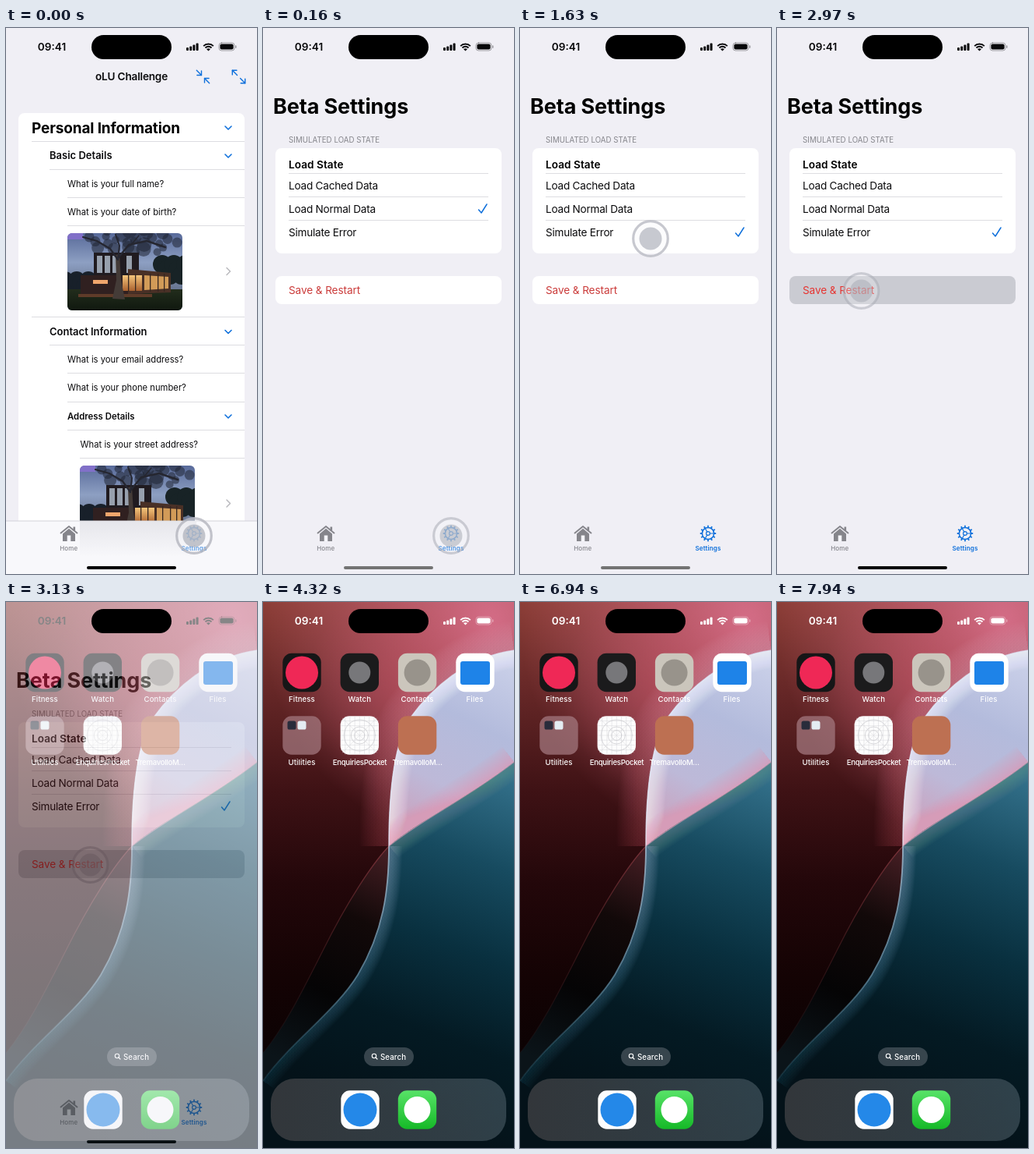
Write an HTML page with a canvas that moves like this. It is 323 px wide and 700 px high and loops after 8 s.

```html
<!DOCTYPE html>
<html lang="en">
<head>
<meta charset="utf-8">
<title>Settings demo</title>
<style>
html, body { margin: 0; width: 100%; height: 100%; overflow: hidden; background: #f0eff5; }
canvas { display: block; width: 323px; height: 700px; }
</style>
</head>
<body>
<canvas id="stage"></canvas>
<script>
const W = 323, H = 700, LOOP = 8000;
const BLUE = '#0f70db', GRAY = '#85858b', PAGE = '#f0eff5', LINE = '#dddde1';
const dpr = window.devicePixelRatio || 1;

function layer(el = document.createElement('canvas')) {
  el.width = Math.round(W * dpr);
  el.height = Math.round(H * dpr);
  const ctx = el.getContext('2d');
  ctx.scale(dpr, dpr);
  return ctx;
}

const out = layer(document.getElementById('stage'));
const app = layer(), home = layer();
let c = out;

const clamp = v => Math.max(0, Math.min(1, v));
const span = (t, a, b) => clamp((t - a) / (b - a));
const ease = p => p * p * (3 - 2 * p);
const mix = (a, b, p) => a + (b - a) * p;

// y is the middle of the capital letters
function text(s, x, y, size, weight = 400, color = '#0b0b0d', gap = 0, align = 'left') {
  c.font = `${weight} ${size}px Inter, "Open Sans", sans-serif`;
  c.letterSpacing = gap + 'px';
  c.textAlign = align;
  c.fillStyle = color;
  c.fillText(s, x, y + size * 0.364);
}

function rect(x, y, w, h, color, r = 0) {
  c.beginPath();
  c.roundRect(x, y, w, h, r);
  c.fillStyle = color;
  c.fill();
}

function disc(x, y, r, color) {
  c.beginPath();
  c.arc(x, y, r, 0, Math.PI * 2);
  c.fillStyle = color;
  c.fill();
}

function ring(x, y, r, color, width) {
  c.beginPath();
  c.arc(x, y, r, 0, Math.PI * 2);
  c.strokeStyle = color;
  c.lineWidth = width;
  c.stroke();
}

function trace(points) {
  c.beginPath();
  points.forEach(p => c.lineTo(p[0], p[1]));
}

function line(points, color, width) {
  trace(points);
  c.strokeStyle = color;
  c.lineWidth = width;
  c.lineCap = c.lineJoin = 'round';
  c.stroke();
}

function shape(points, color) {
  trace(points);
  c.fillStyle = color;
  c.fill();
}

function fade(x0, y0, x1, y1, ...colors) {
  const g = c.createLinearGradient(x0, y0, x1, y1);
  colors.forEach((k, i) => g.addColorStop(i / (colors.length - 1), k));
  return g;
}

const divider = (x, y, end = 307) => rect(x, y, end - x, 1, LINE);
const chevDown = y => line([[282, y - 2], [286, y + 2], [290, y - 2]], BLUE, 1.6);
const chevRight = y => line([[284, y - 4.5], [288.5, y], [284, y + 4.5]], '#b9b9be', 1.5);
const check = y => line([[277.5, y + 1], [281, y + 5], [288, y - 6]], BLUE, 1.5);

function statusBar(color) {
  text('09:41', 59, 24.5, 13.6, 600, color, 0, 'center');
  rect(110, 9, 103, 31, '#000', 15.5);
  [4, 5.5, 7.5, 9.5].forEach((h, i) => rect(232 + i * 4.2, 29 - h, 3, h, color, 1));
  c.save();
  c.beginPath();
  c.moveTo(260.5, 29.5);
  c.arc(260.5, 29.5, 10.5, -Math.PI * 0.75, -Math.PI * 0.25);
  c.clip();
  ring(260.5, 29.5, 9, color, 2);
  ring(260.5, 29.5, 5.7, color, 1.9);
  disc(260.5, 29.5, 3.3, color);
  c.restore();
  c.globalAlpha = 0.4;
  c.beginPath();
  c.roundRect(274, 19, 20, 10, 3.4);
  c.strokeStyle = color;
  c.lineWidth = 0.9;
  c.stroke();
  rect(295.2, 22.3, 1.3, 3.5, color, 1);
  c.globalAlpha = 1;
  rect(275.4, 20.4, 17.2, 7.2, color, 2.1);
}

function gear(x, y) {
  c.save();
  c.translate(x, y);
  ring(0, 0, 7.6, BLUE, 1.5);
  ring(0, 0, 2.4, BLUE, 1.2);
  for (let i = 0; i < 12; i++) {
    c.rotate(Math.PI / 6);
    line([[8.4, 0], [9.5, 0]], BLUE, 1.8);
    if (i % 4 === 3) line([[2.6, 0], [7.2, 0]], BLUE, 1.2);
  }
  c.restore();
}

function tabs() {
  line([[70.5, 647.5], [81, 639], [91.5, 647.5]], GRAY, 1.9);
  rect(86.5, 639.5, 2.6, 5, GRAY);
  shape([[73, 648.5], [81, 641.8], [89, 648.5], [89, 658], [73, 658]], GRAY);
  rect(78.7, 650.5, 4.6, 7.5, '#f5f5f9');
  text('Home', 80.7, 667, 8, 500, GRAY, 0.1, 'center');
  gear(242, 648);
  text('Settings', 242, 667, 8.1, 600, BLUE, 0.1, 'center');
}

function touch(x, y, alpha, ink = '#b4b6bf') {
  if (alpha <= 0) return;
  c.globalAlpha = alpha * 0.35;
  disc(x, y, 22, '#f6f6f9');
  c.globalAlpha = alpha * 0.8;
  ring(x, y, 22.3, ink, 3.2);
  disc(x, y, 14.5, ink);
  c.globalAlpha = 1;
}

// night view of a lit house under a tree
function photo(x, y) {
  c.save();
  c.beginPath();
  c.roundRect(x, y, 148, 99, 6);
  c.clip();
  c.translate(x, y);
  rect(0, 0, 148, 99, fade(0, 0, 0, 75, '#586a9a', '#8d9fc2', '#64718c'));
  rect(0, 0, 20, 8, '#8170c8');
  for (let i = 0; i < 26; i++) {
    const a = i * 2.4, d = Math.sqrt(i / 26);
    c.globalAlpha = 0.55;
    disc(86 + Math.cos(a) * d * 62, 10 + Math.sin(a) * d * 17, 5 + i % 4 * 1.5, '#202634');
  }
  c.globalAlpha = 1;
  for (let i = 0; i < 8; i++) {
    disc(i * 5 - 3, 60 + i % 3 * 4, 11, '#18202a');
    disc(122 + i * 5, 40 + i % 3 * 7, 12, '#182326');
  }
  rect(0, 72, 148, 27, fade(0, 72, 0, 99, '#222d1c', '#10180f'));
  rect(34, 25, 58, 33, '#201b20');
  [38, 48, 58, 76].forEach(wx => rect(wx, 29, 7, 22, '#97a0ad'));
  rect(17, 54, 80, 25, '#302020');
  shape([[78, 46], [133, 51], [133, 76], [78, 78]], '#493026');
  rect(33, 60, 19, 5, '#f0a66c');
  rect(71, 54, 25, 20, fade(71, 54, 71, 74, '#f5c67c', '#aa612f'));
  shape([[99, 54], [130, 56], [130, 71], [99, 73]], '#d29b58');
  [78, 87, 106, 116, 124].forEach(wx => rect(wx, 52, 1.3, 23, '#352620'));
  rect(14, 78, 95, 4, '#5f3b29');
  shape([[58, 84], [63, 60], [62, 28], [67, 27], [69, 60], [74, 85]], '#443b37');
  line([[65, 34], [55, 20], [38, 10], [20, 5]], '#252630', 2.2);
  line([[65, 32], [79, 15], [102, 10], [126, 18]], '#252630', 2.4);
  line([[65, 34], [67, 16], [62, 2]], '#252630', 2);
  line([[82, 15], [92, 3]], '#252630', 1.4);
  c.restore();
}

function arrows(x, y, dir) {
  [-1, 1].forEach(s => {
    const near = [x + 2 * s, y + 2 * s], far = [x + 8.2 * s, y + 8.2 * s];
    const tip = dir > 0 ? far : near, k = 5.6 * s * dir;
    line([near, far], BLUE, 1.4);
    line([[tip[0] - k, tip[1]], tip, [tip[0], tip[1] - k]], BLUE, 1.4);
  });
}

function formPage() {
  rect(0, 0, W, H, PAGE);
  text('oLU Challenge', 161.5, 62, 13.6, 600, '#0b0b0d', -0.2, 'center');
  arrows(253.5, 62.5, -1);
  arrows(299.5, 62.5, 1);
  rect(16, 109, 291, 530, '#fff', [8, 8, 0, 0]);
  text('Personal Information', 33, 128, 19, 700, '#000', -0.15);
  [[56, 163.5, 'Basic Details', 13], [56, 389, 'Contact Information', 13], [79, 497.5, 'Address Details', 11.4]]
    .forEach(([x, y, s, size]) => text(s, x, y, size, 600));
  [[79, 199.5, 'full name'], [79, 236, 'date of birth'], [79, 425, 'email address'],
    [79, 461, 'phone number'], [95.5, 533.5, 'street address']]
    .forEach(([x, y, s]) => text(`What is your ${s}?`, x, y, 11.25));
  [[33, 145], [56, 181], [79, 217], [79, 253], [33, 370], [56, 406], [79, 442], [79, 479], [79, 515], [95, 551]]
    .forEach(p => divider(...p));
  [128, 164, 389.5, 498].forEach(chevDown);
  photo(79, 263);
  photo(95, 561);
  chevRight(312);
  chevRight(609.5);
  rect(0, 632, W, 68, '#f8f8fb');
  rect(95, 633, 150, 45, fade(0, 633, 0, 678, '#e6e6eb', '#f8f8fb'));
  rect(0, 631.5, W, 1, '#d4d4d9');
}

function settingsPage(t) {
  rect(0, 0, W, H, PAGE);
  text('Beta Settings', 13, 100, 27, 700, '#000', -0.1);
  text('SIMULATED LOAD STATE', 33, 143, 9.7, 400, GRAY, 0.05);
  rect(16, 154, 291, 135, '#fff', 8);
  text('Load State', 33, 175, 13.6, 600, '#000', 0.05);
  ['Load Cached Data', 'Load Normal Data', 'Simulate Error'].forEach((s, i) => {
    divider(33, 186 + i * 30, 290);
    text(s, 33, 202 + i * 30, 13.6, 400, '#0b0b0d', -0.24);
  });
  check(t < 1470 ? 232 : 262);
  const pressed = t >= 2890;
  rect(16, 318, 291, 36, pressed ? '#cacbd2' : '#fff', 8);
  text('Save & Restart', 33, 336.5, 13.6, 400, pressed ? '#e63532' : '#cb3c3b', -0.1);
}

function drawApp(t) {
  if (t < 120) formPage(); else settingsPage(t);
  statusBar('#08080a');
  tabs();
  const tone = t < 120 ? 0 : Math.round(mix(115, 10, span(t, 2330, 2900)));
  rect(104, 690, 115, 4, `rgb(${tone},${tone},${tone})`, 2);
  if (t < 320) touch(242, 651, 1 - span(t, 120, 320));
  else if (t >= 1110) {
    const a = ease(span(t, 1110, 1470)), b = ease(span(t, 2330, 2850));
    const x = mix(mix(169, 168, a), 108.5, b), y = mix(mix(295, 270, a), 337, b);
    touch(x, y, mix(0.7, 1, a) * mix(1, 0.65, b), b > 0.9 ? '#a9abb4' : '#b9bbc4');
  }
}

function path(d, color) {
  c.fillStyle = color;
  c.fill(new Path2D(d));
}

function stroke(d, color, width) {
  c.strokeStyle = color;
  c.lineWidth = width;
  c.lineCap = 'butt';
  c.stroke(new Path2D(d));
}

// soft light along a curve: many thin veils, brightest in the middle
function halo(d, color, width, alpha) {
  c.globalAlpha = alpha / 14;
  for (let i = 1; i <= 24; i++) stroke(d, color, width * i / 24);
  c.globalAlpha = 1;
}

function inside(d, draw) {
  c.save();
  c.clip(new Path2D(d));
  draw();
  c.restore();
}

function glow(x, y, r, rgb, alpha) {
  const g = c.createRadialGradient(x, y, 0, x, y, r);
  g.addColorStop(0, `rgba(${rgb},${alpha})`);
  g.addColorStop(0.5, `rgba(${rgb},${alpha * 0.45})`);
  g.addColorStop(1, `rgba(${rgb},0)`);
  c.fillStyle = g;
  c.fillRect(0, 0, W, H);
}

function drawPaper() {
  const crest = 'M323 62C262 70 216 112 190 148C166 185 162 255 162 313';
  const fold = 'M162 313C200 281 264 251 323 205';
  const stem = 'M162 313C162 370 155 422 122 478C94 524 32 568 0 614';
  const shade = 'M162 313C140 336 108 385 77 447C52 496 28 545 0 578';
  const sheet = crest + 'C200 281 264 251 323 205Z';
  const sea = stem + 'V700H323V205C264 251 200 281 162 313Z';

  rect(0, 0, W, H, fade(0, 0, 0, 600, '#8c3e37', '#642626', '#3f1215', '#23070a', '#140304', '#0a0203'));
  glow(290, 25, 290, '217,112,140', 0.95);
  glow(195, 110, 140, '190,78,92', 0.55);
  halo(crest, fade(0, 50, 0, 313, '#d68ca2', '#b55c6c', '#782a34'), 75, 0.55);
  path(shade + 'V614C32 568 94 524 122 478C155 422 162 370 162 313Z',
    fade(165, 312, 30, 590, '#4a2026', '#120909', '#050405', '#0b1419'));
  stroke(shade, fade(162, 313, 0, 578, 'rgba(165,70,78,.6)', 'rgba(95,40,44,.5)', 'rgba(60,40,45,.1)'), 1.2);

  path(sheet, fade(295, 70, 178, 305, '#c9cfe8', '#b3bbdc', '#bdb9d8', '#cf9bb6'));
  inside(sheet, () => {
    halo(crest, '#e6eefc', 46, 0.45);
    halo(fold, '#d795b0', 50, 0.5);
  });
  path(sea, fade(290, 215, 130, 640, '#33708a', '#174b60', '#09303f', '#041a23', '#041219'));
  inside(sea, () => {
    halo(fold, '#6d809e', 40, 0.4);
    halo(stem, fade(162, 313, 0, 614, '#7893ac', '#2f5d74', '#10303d'), 34, 0.5);
  });
  stroke(crest, 'rgba(225,236,250,.7)', 1.6);
  stroke(stem, fade(162, 313, 0, 614, 'rgba(170,195,215,.8)', 'rgba(105,145,168,.7)', 'rgba(50,90,105,.3)'), 1.8);
  stroke(fold, 'rgba(225,165,190,.6)', 1.5);
}

const tile = (x, y, color) => rect(x - 24.7, y - 24.7, 49.4, 49.4, color, 11.5);

function gridTile(x, y) {
  tile(x, y, '#fdfdfd');
  const ink = '#d6d6da';
  for (let i = -3; i <= 3; i++) {
    const d = i * 6.2;
    line([[x + d, y - 24], [x + d, y + 24]], ink, 0.5);
    line([[x - 24, y + d], [x + 24, y + d]], ink, 0.5);
  }
  line([[x - 22, y - 22], [x + 22, y + 22]], ink, 0.5);
  line([[x - 22, y + 22], [x + 22, y - 22]], ink, 0.5);
  [6.5, 11, 20].forEach(r => ring(x, y, r, '#c0c0c5', 0.6));
}

function drawHome() {
  drawPaper();
  statusBar('#fff');
  tile(50, 90.5, '#161617');
  disc(50, 90.5, 21, '#ef2856');
  tile(124.3, 90.5, '#1b1b1c');
  disc(124.3, 90.5, 14, '#77777a');
  tile(198.6, 90.5, '#cbc6bc');
  disc(198.6, 90.5, 17, '#98938b');
  tile(273, 90.5, '#fff');
  rect(254, 76, 38, 30, '#1e83e8', 3);
  tile(50, 171, 'rgba(166,122,130,.72)');
  rect(31.5, 152.5, 11, 11, '#292c3b', 2.6);
  rect(44.5, 152.5, 11, 11, '#e4edf3', 2.6);
  gridTile(124.3, 171);
  tile(198.6, 171, '#bd7052');
  [['Fitness', 50, 125], ['Watch', 124.3, 125], ['Contacts', 198.6, 125], ['Files', 272.5, 125], ['Utilities', 50, 205.5]]
    .forEach(([s, x, y]) => text(s, x, y, 9.6, 500, '#fff', 0.1, 'center'));
  text('EnquiriesPocket', 124.5, 205.5, 9.6, 500, '#fff', -0.3, 'center');
  text('TremavolloM…', 198.6, 205.5, 9.6, 500, '#fff', -0.3, 'center');
  rect(130, 571, 64, 24, 'rgba(86,98,106,.62)', 12);
  ring(143, 582, 2.7, '#fff', 1.1);
  line([[145, 584], [147, 586]], '#fff', 1.2);
  text('Search', 167.5, 583, 9.7, 500, '#fff', 0.1, 'center');
  rect(10, 611, 303, 80, fade(10, 0, 313, 0, 'rgba(88,84,86,.55)', 'rgba(82,100,110,.55)'), 31);
  tile(125, 651, '#fdfdfd');
  disc(125, 651, 21.5, '#2488e8');
  tile(198.5, 651, fade(0, 626, 0, 676, '#58e368', '#15b927'));
  disc(198.5, 651, 17, '#fff');
}

function put(src, alpha) {
  out.globalAlpha = alpha;
  out.drawImage(src.canvas, 0, 0, W, H);
  out.globalAlpha = 1;
}

c = home;
drawHome();
c = app;

const start = performance.now();
function frame(now) {
  const t = Math.max(0, now - start) % LOOP;
  const exit = ease(span(t, 3050, 3210));
  if (exit < 1) {
    drawApp(t);
    put(app, 1);
  }
  if (exit > 0) put(home, exit);
  requestAnimationFrame(frame);
}
requestAnimationFrame(frame);
</script>
</body>
</html>
```
